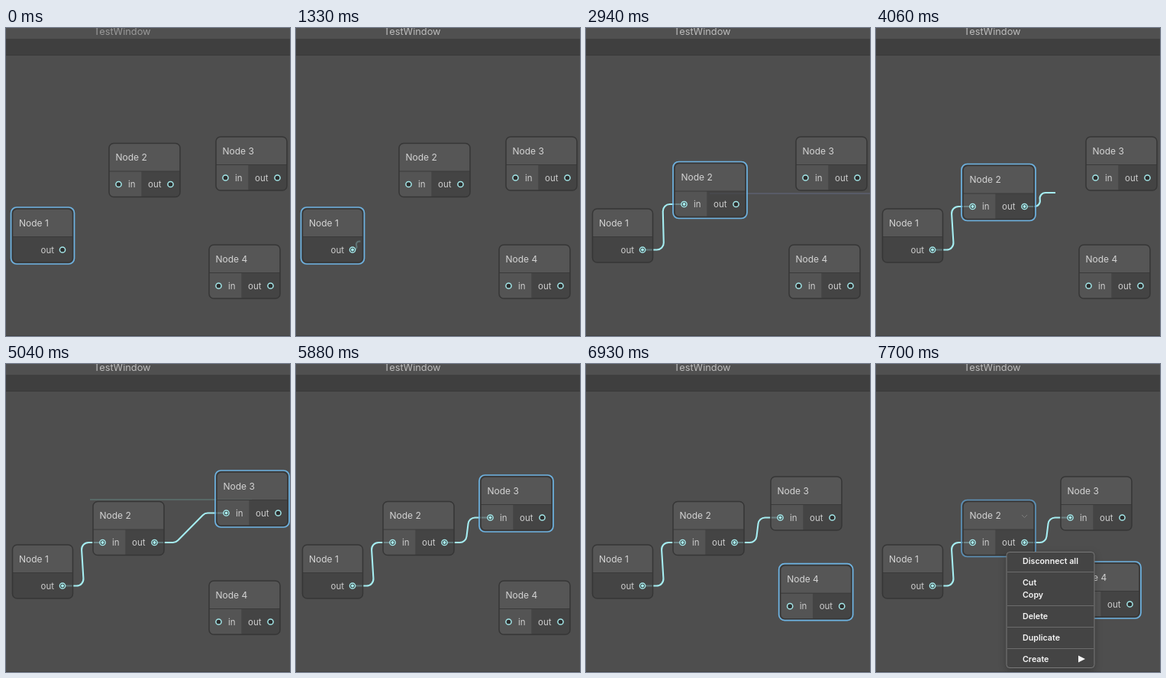
An HTML page that plays this animation: 372x402 px, repeating every 8 s.

```html
<!DOCTYPE html>
<html lang="en">
<head>
<meta charset="utf-8">
<title>Node editor</title>
<style>
  html, body { margin: 0; width: 100%; height: 100%; overflow: hidden; background: #4e4e4e; }
  svg { display: block; width: 372px; height: 402px; }
  text { font-family: Inter, "Open Sans", sans-serif; }
  .title { font-size: 12.8px; }
  .name { font-size: 12px; fill: #d4d4d4; }
  .label { font-size: 11.5px; fill: #cccccc; }
  .item { font-size: 10.7px; font-weight: 600; fill: #f6f6f6; }
  .wire { fill: none; stroke: #a5edf1; stroke-width: 2.1; }
  .menu { filter: drop-shadow(0 3px 5px rgba(0, 0, 0, .25)); }
</style>
</head>
<body>
<svg id="stage" viewBox="0 0 372 402"></svg>
<script>
const LOOP = 8000, STEP = 70;
const ROW = 53.5, HEAD = 36.5, H = 70, OUTSET = 2;
const stage = document.getElementById('stage');

function add(parent, tag, attrs = {}, text) {
  const el = document.createElementNS('http://www.w3.org/2000/svg', tag);
  for (const k in attrs) el.setAttribute(k, attrs[k]);
  if (text) el.textContent = text;
  parent.append(el);
  return el;
}
const rect = (p, x, y, width, height, fill, more) =>
  add(p, 'rect', { x, y, width, height, fill, ...more });
const label = (p, x, y, cls, s) => add(p, 'text', { x, y, class: cls }, s);
const show = (el, on) => el.setAttribute('visibility', on ? 'visible' : 'hidden');

// Keys are [time, x, y]; straight runs between them.
function at(keys, t) {
  let a = keys[0];
  for (const b of keys) {
    if (t < b[0]) {
      if (a === b) return [b[1], b[2]];
      const k = (t - a[0]) / (b[0] - a[0]);
      return [a[1] + (b[1] - a[1]) * k, a[2] + (b[2] - a[2]) * k];
    }
    a = b;
  }
  return [a[1], a[2]];
}

// Window frame
rect(stage, 0, 0, 372, 402, '#4e4e4e');
rect(stage, 0, 0, 372, 15, '#505050');
rect(stage, 0, 14, 372, 22, '#3f3f3f');
rect(stage, 0, 35, 372, 1, '#3a3a3a');
rect(stage, 0, 401, 372, 1, '#424242');
const title = label(stage, 115, 9, 'title', 'TestWindow');

const wireLayer = add(stage, 'g');
const nodeLayer = add(stage, 'g');

function port(g, x) {
  add(g, 'circle', { cx: x, cy: ROW, r: 3.6, fill: '#2d2d2d', stroke: '#a4e8ea', 'stroke-width': 1.5 });
  return add(g, 'circle', { cx: x, cy: ROW, r: 2, fill: '#a8f0f2' });
}

function makeNode(name, w, hasIn, keys) {
  const g = add(nodeLayer, 'g');
  const split = hasIn ? 42.5 : 0;
  const outX = hasIn ? 80.5 : 65.5;
  const body = add(g, 'g', { 'fill-opacity': 0.7 });
  add(body, 'path', { fill: '#5b5b5b', d: `M0 ${HEAD}V6Q0 0 6 0H${w - 6}Q${w} 0 ${w} 6V${HEAD}Z` });
  if (hasIn) add(body, 'path', { fill: '#585858', d: `M0 ${HEAD}H${split}V${H}H6Q0 ${H} 0 ${H - 6}Z` });
  const left = hasIn ? `V${H}` : `V${H - 6}Q0 ${H} 6 ${H}`;
  add(body, 'path', {
    fill: '#414141',
    d: `M${split} ${HEAD}${left}H${w - 6}Q${w} ${H} ${w} ${H - 6}V${HEAD}Z`
  });
  rect(g, 0, HEAD - 0.5, w, 1, '#3a3a3a');
  rect(g, 0, 0, w, H, 'none', { rx: 6, stroke: '#363636', 'stroke-width': 1.5 });
  const ring = rect(g, -OUTSET, -OUTSET, w + 2 * OUTSET, H + 2 * OUTSET, 'none',
    { rx: 7.5, stroke: '#6db3e2', 'stroke-width': 1.7 });
  label(g, 8.5, 22.7, 'name', name);
  if (hasIn) label(g, 25, ROW + 4, 'label', 'in');
  label(g, w - 42, ROW + 4, 'label', 'out');
  return {
    g, ring, keys, outX,
    inDot: hasIn && port(g, 12.5),
    outDot: port(g, outX)
  };
}

const n1 = makeNode('Node 1', 79, false, [[0, 8.5, 236]]);
const n2 = makeNode('Node 2', 93, true, [
  [2660, 135, 150.5], [2800, 124, 165], [2940, 116, 176.5], [3080, 114.5, 179], [3290, 114, 179.5]
]);
const n3 = makeNode('Node 3', 93, true, [
  [4970, 275, 142], [5040, 276, 141], [5110, 275, 141], [5390, 252, 144.5], [5600, 242, 147]
]);
const n4 = makeNode('Node 4', 93, true, [
  [6230, 266, 283], [6580, 266, 274], [6860, 256, 264], [7070, 252, 260]
]);
const nodes = [n1, n2, n3, n4];

// Lead-outs of up to 28 px, joined with rounded corners.
function wirePath([ax, ay], [bx, by]) {
  const off = Math.min(28, Math.hypot(bx - ax, by - ay) / 2);
  const px = ax + off, qx = bx - off;
  const dx = qx - px, dy = by - ay, len = Math.hypot(dx, dy);
  if (len < 1) return `M${ax} ${ay}L${bx} ${by}`;
  const turn = Math.abs(Math.atan2(dy, dx));
  const cut = Math.min(9 * Math.tan(turn / 2), off * 0.9, len / 2);
  const r = cut / Math.max(Math.tan(turn / 2), 1e-4);
  const ux = dx / len * cut, uy = dy / len * cut, down = dy > 0 ? 1 : 0;
  return `M${ax} ${ay}H${px - cut}A${r} ${r} 0 0 ${down} ${px + ux} ${ay + uy}` +
    `L${qx - ux} ${by - uy}A${r} ${r} 0 0 ${1 - down} ${qx + cut} ${by}H${bx}`;
}

const wires = [
  { from: n1, to: n2, hover: 980, start: 1260, end: 1960,
    drag: [[1190, 74, 289.5], [1540, 100, 262], [1820, 135, 215], [1960, 147.5, 204]] },
  { from: n2, to: n3, hover: 3500, start: 3710, end: 4480,
    drag: [[3640, 194.5, 233], [4060, 235, 215], [4340, 275, 198], [4480, 287.5, 195.5]] }
];
for (const w of wires) w.el = add(wireLayer, 'path', { class: 'wire' });

// Alignment guides: [start, end, x1, x2, y, colour]
const guides = [
  [2870, 3290, 162, 372, 216, '#626880'],
  [5040, 5180, 110, 322, 177, '#62827f'],
  [6510, 6650, 5, 312, 309.5, '#6a7686']
].map(([from, to, x1, x2, y, stroke]) => ({
  from, to, el: add(wireLayer, 'line', { x1, x2, y1: y, y2: y, stroke })
}));

const chevron = add(n2.g, 'path', { d: 'M77 17.5L80.5 21L84 17.5', fill: 'none', stroke: '#7c7c7c' });

// Context menu
const menu = add(stage, 'g', { class: 'menu' });
rect(menu, 171, 245.5, 115, 151, '#444444', { rx: 4, stroke: '#787878' });
for (const y of [271, 315, 343, 371]) rect(menu, 172, y, 113, 1, '#6c6c6c');
[['Disconnect all', 256.7], ['Cut', 285], ['Copy', 301], ['Delete', 329], ['Duplicate', 357], ['Create', 385]]
  .forEach(([s, y]) => label(menu, 192, y + 4, 'item', s));
add(menu, 'path', { d: 'M265 380.5L274 385L265 389.5Z', fill: '#f6f6f6' });

function render(t) {
  for (const n of nodes) {
    n.pos = at(n.keys, t);
    n.g.setAttribute('transform', `translate(${n.pos[0]} ${n.pos[1]})`);
    show(n.outDot, false);
    if (n.inDot) show(n.inDot, false);
  }
  title.setAttribute('fill', t < 980 ? '#9a9a9a' : '#bdbdbd');
  show(n1.ring, t < 2450);
  show(n2.ring, (t >= 2450 && t < 4900) || t >= 7420);
  n2.ring.setAttribute('stroke', t >= 7420 ? '#5b91b8' : '#6db3e2');
  show(n3.ring, t >= 4900 && t < 5950);
  show(n4.ring, t >= 5950);

  for (const w of wires) {
    const a = [w.from.pos[0] + w.from.outX, w.from.pos[1] + ROW];
    const b = t < w.end ? at(w.drag, t) : [w.to.pos[0] + 12.5, w.to.pos[1] + ROW];
    show(w.el, t >= w.start);
    w.el.setAttribute('d', wirePath(a, b));
    show(w.from.outDot, t >= w.hover);
    show(w.to.inDot, t >= w.end);
  }
  for (const s of guides) show(s.el, t >= s.from && t < s.to);
  show(chevron, t >= 7630);
  show(menu, t >= 7630);
}

const begin = performance.now();
function frame() {
  const t = (performance.now() - begin) % LOOP;
  render(Math.floor(t / STEP) * STEP);
  requestAnimationFrame(frame);
}
render(0);
requestAnimationFrame(frame);
</script>
</body>
</html>
```
